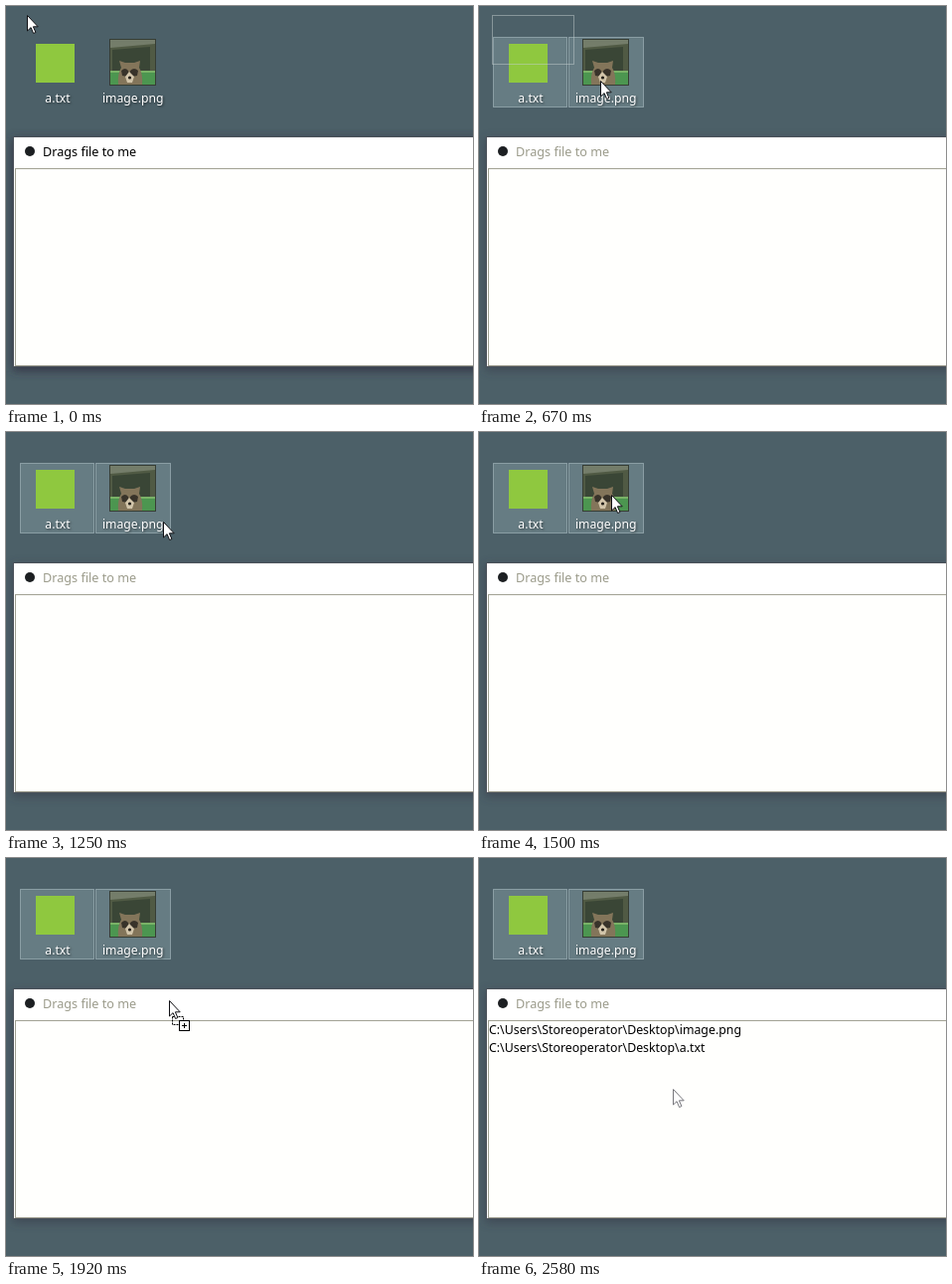
An HTML page for the animation above (2660 ms loop, 470 by 400 pixels).

```html
<!DOCTYPE html>
<html lang="en">
<head>
<meta charset="utf-8">
<title>Drag files to a window</title>
<style>
  html, body { margin: 0; width: 470px; height: 400px; overflow: hidden; background: #4c6068; }
  svg { display: block; }
  text { font: 12.35px "Noto Sans", "Open Sans", sans-serif; }
  .label { fill: #fff; text-anchor: middle; font-size: 12.2px; filter: drop-shadow(1px 1px 1px #0008); }
  .cell { fill: #b4cdd2; fill-opacity: .25; stroke: #bccdd4; stroke-opacity: .5; }
  #title { font-size: 12.65px; }
</style>
</head>
<body>
<svg width="470" height="400" viewBox="0 0 470 400">
  <defs>
    <filter id="blur" x="-10%" y="-20%" width="120%" height="140%"><feGaussianBlur stdDeviation="5"/></filter>
    <g id="doc">
      <rect x="30" y="38" width="39" height="39" fill="#8fc83f"/>
      <text class="label" x="52" y="97">a.txt</text>
    </g>
    <g id="photo">
      <rect x="104" y="33" width="47" height="47" fill="#363d34"/>
      <rect x="105" y="34" width="45" height="32" fill="#505a44"/>
      <path d="M105 34h45v4l-45 4z" fill="#747d6a"/>
      <path d="M107 44l38-3v24h-38z" fill="#3a4636"/>
      <rect x="105" y="65" width="45" height="14" fill="#4c9650"/>
      <path d="M105 65h45v2h-45z" fill="#79b267"/>
      <path d="M113 79q-1-11 3-17l-2-7 6 2h9l6-2-1 7q4 6 3 17z" fill="#83755a"/>
      <path d="M116 65q4-4 7 0l1 4 1-4q4-4 8 0l-1 5-5 1h-5l-5-1z" fill="#38332a"/>
      <path d="M120 71l4-5 5 5-2 6h-5z" fill="#d2c5aa"/>
      <circle cx="124.500" cy="72" r="1.600" fill="#221e18"/>
      <text class="label" x="127.700" y="97">image.png</text>
    </g>
  </defs>

  <rect width="470" height="400" fill="#4c6068"/>
  <g class="cell">
    <rect id="cellDoc" x="14.5" y="31.5" width="74" height="70"/>
    <rect id="cellPhoto" x="90.5" y="31.5" width="75" height="70"/>
  </g>
  <use href="#doc"/>
  <use href="#photo"/>

  <rect id="shadow" x="6" y="133" width="480" height="234" fill="#2d2b3c" filter="url(#blur)"/>
  <rect x="7.5" y="131.5" width="480" height="231" fill="#fff" stroke="#4c525a"/>
  <circle cx="24" cy="146" r="5" fill="#1c1f22"/>
  <text id="title" x="37" y="151">Drags file to me</text>
  <rect x="9.5" y="163.5" width="480" height="198" fill="#fffffd" stroke="#a2a294"/>
  <g id="list">
    <text x="10" y="177">C:\Users\Storeoperator\Desktop\image.png</text>
    <text x="10" y="195">C:\Users\Storeoperator\Desktop\a.txt</text>
  </g>

  <path id="marquee" fill="none" stroke="#c3cdcd" stroke-dasharray="1 1"/>
  <g id="ghost" opacity=".62"><use href="#doc"/><use href="#photo"/></g>
  <g id="cursor">
    <g id="badge" fill="none" stroke="#000">
      <rect x="3.5" y="16.5" width="11" height="8" stroke-dasharray="2 1"/>
      <rect x="10.5" y="20.5" width="10" height="10" fill="#fff"/>
      <path d="M13 25.5h5M15.5 23v5"/>
    </g>
    <path id="arrow" d="M.5.5v15.5l3.6-3.4 2.5 5.9 2.3-1-2.5-5.7h4.8z" fill="#fff"/>
  </g>
</svg>
<script>
const LOOP = 2660;
const PRESS = 2, RELEASE = 13, DRAG = 20, DROP = 29;
const grab = [134, 66];
const windowTop = 132;

// [step, x, y] of the pointer, twelve steps a second
const path = [
  [0, 21, 9], [2, 13, 9], [5, 53, 39], [6, 73, 48], [11, 171, 104], [13, 171, 104],
  [18, 133, 63], [19, ...grab], [21, 141, 81], [26, 195, 232], [32, 195, 232]
];

const $ = id => document.getElementById(id);
const show = (id, on) => $(id).setAttribute("visibility", on ? "visible" : "hidden");
const move = (id, x, y) => $(id).setAttribute("transform", `translate(${x} ${y})`);

// monotone cubic through the path points: comes to rest at turns and pauses
const slope = (n, c) => (path[n + 1][c] - path[n][c]) / (path[n + 1][0] - path[n][0]);
function tangent(n, c) {
  if (n === 0 || n === path.length - 1) return 0;
  const a = slope(n - 1, c), b = slope(n, c);
  return a * b > 0 ? 2 * a * b / (a + b) : 0;
}

function pointer(step) {
  const n = Math.max(1, path.findIndex(p => p[0] >= step)) - 1;
  const p = path[n], q = path[n + 1];
  const span = q[0] - p[0], u = (step - p[0]) / span, v = 1 - u;
  return [1, 2].map(c => Math.round(
    p[c] * v * v * (1 + 2 * u) + q[c] * u * u * (3 - 2 * u) +
    span * u * v * (tangent(n, c) * v - tangent(n + 1, c) * u)));
}

function draw(step) {
  const [x, y] = pointer(step);
  const active = step < PRESS;
  const dropped = step >= DROP;
  const dragging = step >= DRAG && !dropped;
  const inside = y >= windowTop;

  move("cursor", x, y);
  show("badge", dragging && inside);
  $("arrow").setAttribute("stroke", dropped ? "#77777c" : "#101014");

  $("title").setAttribute("fill", active ? "#000" : "#9c9c8c");
  $("shadow").setAttribute("opacity", active ? .75 : .4);
  show("list", dropped);

  // the selection box trails the pointer by one step
  const [mx, my] = pointer(Math.min(RELEASE, Math.max(PRESS, step - 1)));
  const covered = my > 40;
  const open = `M13.5 ${my}V9.5H${mx}`;
  const closed = `M13.5 9.5H${mx - .5}V${my - 1.5}H13.5Z`;
  $("marquee").setAttribute("d", covered ? closed : open);
  show("marquee", step > PRESS && step < RELEASE);
  show("cellDoc", covered);
  show("cellPhoto", covered && mx > 90);

  move("ghost", x - grab[0], y - grab[1]);
  show("ghost", dragging && !inside);
}

const start = performance.now();
function tick() {
  const t = (performance.now() - start) % LOOP;
  // steps of 1/12 s, rounded to hundredths
  draw(Math.min(31, Math.floor((Math.floor(t / 10) + .5) * .12)));
  requestAnimationFrame(tick);
}
tick();
</script>
</body>
</html>
```
